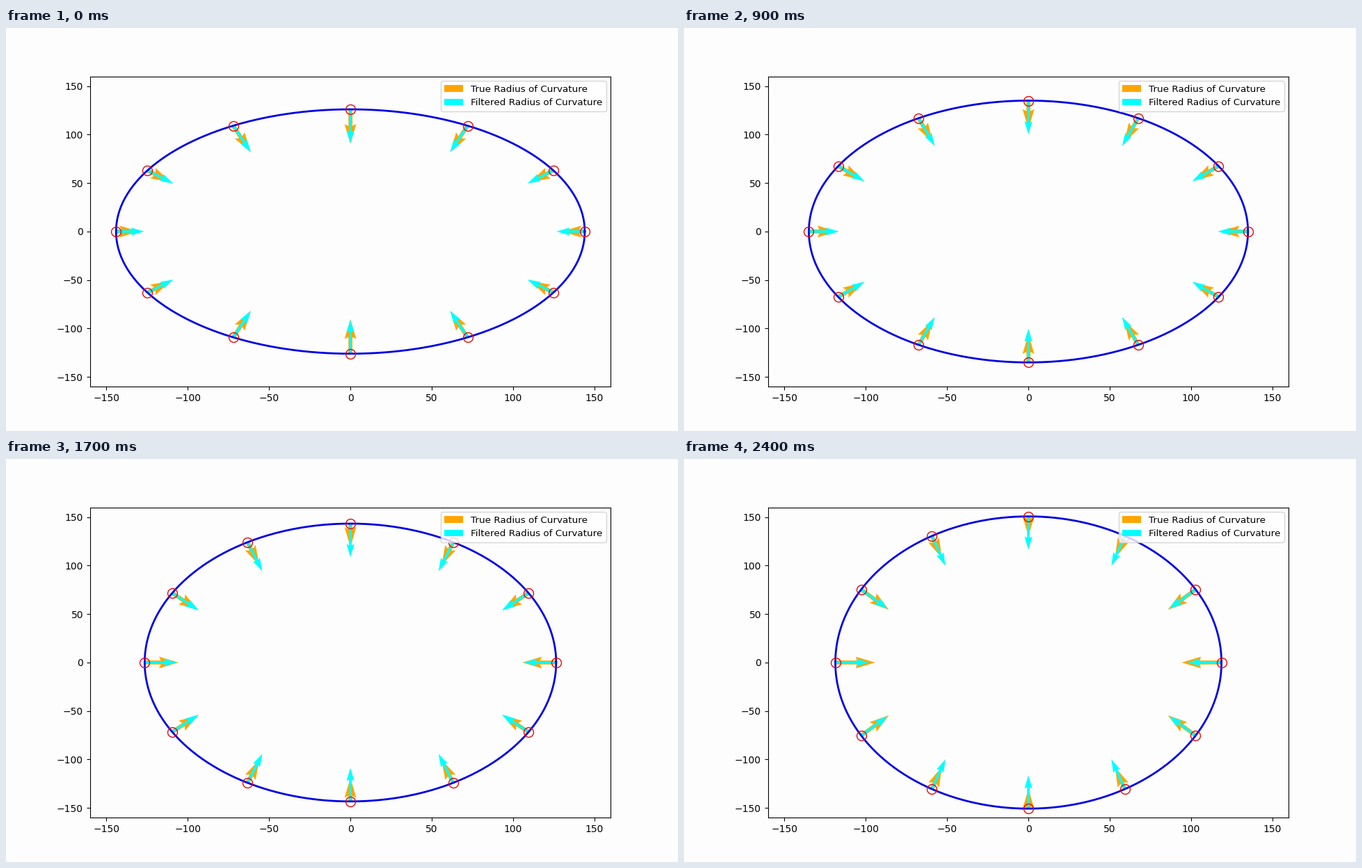
Recreate the animation shown at these times as a matplotlib script. Size 966 by 580 pixels, loop 2.45 s.

```python
import numpy as np
import matplotlib.pyplot as plt
from matplotlib.animation import FuncAnimation

FRAMES = 49
INTERVAL = 50
PAPER = "#fdfdfd"

plt.rcParams["font.family"] = "DejaVu Sans"

outline = np.linspace(0, 2 * np.pi, 361)
nodes = np.arange(12) * np.pi / 6


def semi_axes(t):
    """The ellipse narrows and grows taller, speeding up slightly."""
    return 144 - 0.49 * t - 0.0008 * t**2, 126 + 0.49 * t + 0.0005 * t**2


def points(a, b, theta):
    return np.column_stack([a * np.cos(theta), b * np.sin(theta)])


def true_radius(a, b, theta):
    s, c = np.sin(theta), np.cos(theta)
    return (a**2 * s**2 + b**2 * c**2) ** 1.5 / (a * b)


def filtered_radius(t, theta):
    side, top = 135 + 0.55 * t, 163.5 - 0.08 * t
    s, c = np.sin(theta), np.cos(theta)
    return side * c**2 + top * s**2 - 4 * np.sin(2 * theta) ** 2


fig, ax = plt.subplots(figsize=(9.66, 5.8), dpi=100, facecolor=PAPER)
ax.set_facecolor(PAPER)
ax.set_xlim(-160, 160)
ax.set_ylim(-160, 160)

curve, = ax.plot([], [], color="#0000e6", lw=2)
rings, = ax.plot([], [], "o", color="#e60808", ms=10, mfc="none", mew=1)


def make_arrows(color, width, label):
    zeros = np.zeros(len(nodes))
    return ax.quiver(zeros, zeros, zeros, zeros, color=color, width=width,
                     scale=2500, scale_units="width", label=label)


true_arrows = make_arrows("orange", 0.0075, "True Radius of Curvature")
filtered_arrows = make_arrows("cyan", 0.005, "Filtered Radius of Curvature")
ax.legend(loc="upper right", fontsize=9.7)


def update(t):
    a, b = semi_axes(t)
    spots = points(a, b, nodes)
    inward = -spots / np.linalg.norm(spots, axis=1)[:, None]
    curve.set_data(*points(a, b, outline).T)
    rings.set_data(*spots.T)
    for arrows, radius in ((true_arrows, true_radius(a, b, nodes)),
                           (filtered_arrows, filtered_radius(t, nodes))):
        arrows.set_offsets(spots)
        arrows.set_UVC(*(inward * radius[:, None]).T)
    return curve, rings, true_arrows, filtered_arrows


anim = FuncAnimation(fig, update, frames=FRAMES, interval=INTERVAL,
                     repeat=True, repeat_delay=0)
plt.show()
```
